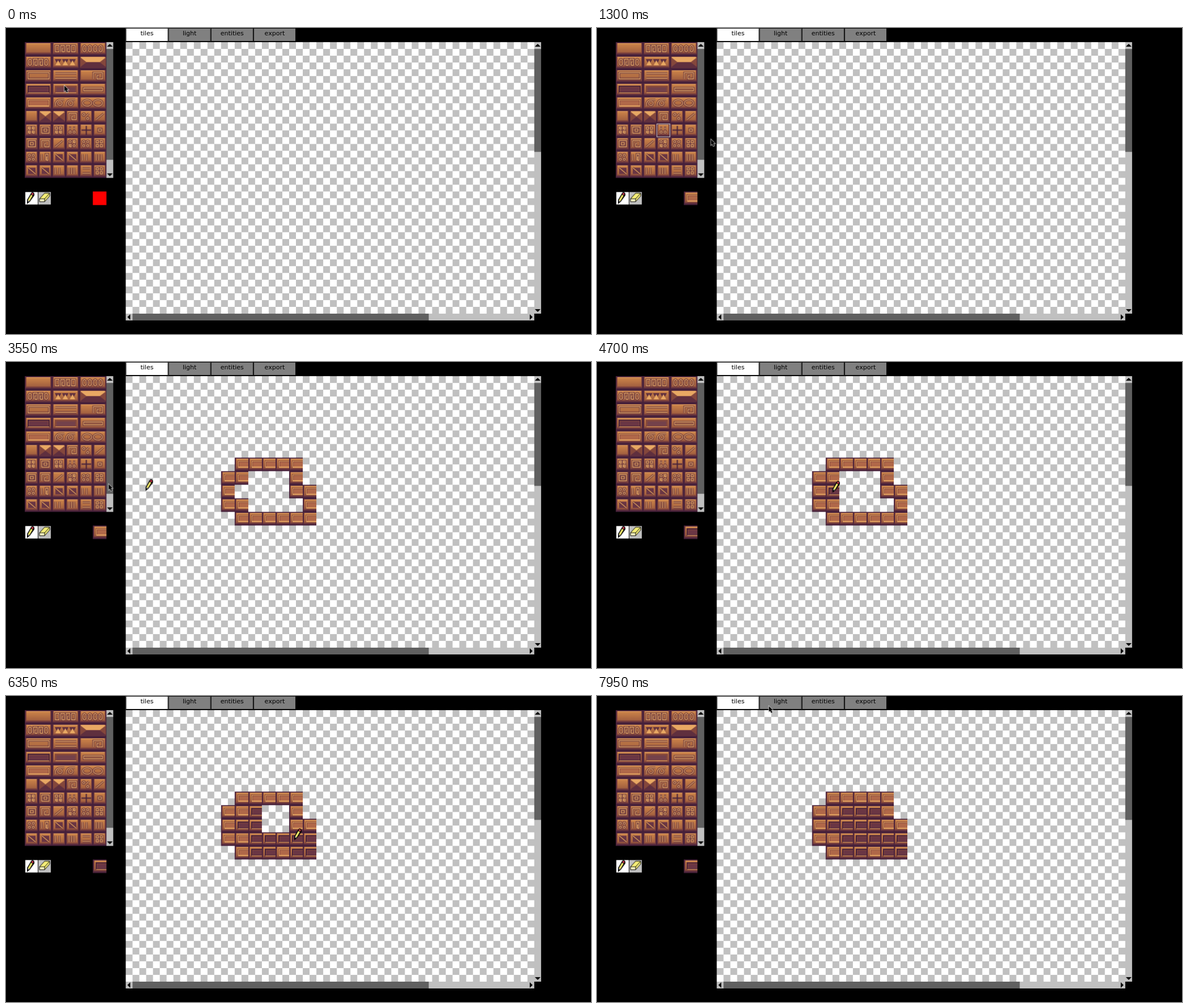
Write an HTML page with a canvas that moves like this. It is 1033 px wide and 542 px high and loops after 8 s.

```html
<!DOCTYPE html>
<html lang="en">
<head>
<meta charset="utf-8">
<title>Tile editor</title>
<style>
html, body { margin: 0; width: 100%; height: 100%; overflow: hidden; background: #000; }
main { position: absolute; left: 0; top: 0; width: 1031px; height: 541px; transform: scale(1.00194, 1.00185); transform-origin: 0 0; }
nav { position: absolute; left: 211px; top: 0; display: flex; }
nav span {
  box-sizing: border-box; width: 75px; height: 24px; border: 1px solid #000;
  background: #808080; color: #000; text-align: center;
  font: 11px/18px "DejaVu Sans", sans-serif;
}
nav span:first-child { background: #fff; }
canvas { position: absolute; left: 0; top: 0; }
</style>
</head>
<body>
<main>
  <nav><span>tiles</span><span>light</span><span>entities</span><span>export</span></nav>
  <canvas id="stage" width="1031" height="541"></canvas>
</main>
<script>
const LOOP = 8000, TICK = 50, CELL = 24;
const PICK_LIGHT = 1200, PICK_DARK = 4200;
const DARK = '#45203a', EDGE = '#5f2f3e', SHADE = '#84473c', MID = '#b56d43', LITE = '#e8a863', PLUM = '#6a3644';
const MAP = { x: 211, y: 25, w: 720, h: 480 };
const PAL = { x: 33, y: 25, w: 144, h: 240 };
const stage = document.getElementById('stage');
const view = stage.getContext('2d');
let g = view;

const rect = (color, x, y, w, h) => { g.fillStyle = color; g.fillRect(x, y, w, h); };
const inside = (area, p) => p.x >= area.x && p.y >= area.y && p.x < area.x + area.w && p.y < area.y + area.h;

function poly(color, ...p) {
  g.beginPath();
  for (let i = 0; i < p.length; i += 2) g.lineTo(p[i], p[i + 1]);
  g.closePath();
  g.fillStyle = color;
  g.fill();
}

function line(color, width, path) {
  g.strokeStyle = color;
  g.lineWidth = width;
  g.stroke(new Path2D(path));
}

// --- carved stone tiles: one letter per motif, spread over the face ---
function carve(path) {
  line(EDGE, 3.4, path);
  line(LITE, 1.3, path);
}

function panel(x, y, w, h, rim, fill) {
  rect(rim === DARK ? DARK : SHADE, x - 1, y - 1, w + 2, h + 2);
  rect(rim, x, y, w, h);
  rect(SHADE, x + 1, y + 1, w - 2, h - 2);
  rect(fill, x + 2, y + 2, w - 4, h - 3);
  rect(LITE, x, y + h, w, 1);
}

const motif = {
  ' ': () => {},
  b: (x, y, w, h) => carve(`M${x} ${y}h${w}v${h}h${-w}z`),
  o: (x, y, w, h) => carve(`M${x} ${y + h / 2}a${w / 2} ${h / 2} 0 1 1 0 .1z`),
  s: (x, y, w, h) => carve(`M${x} ${y + h}v${-h}h${w}v${h}h${-w * .6}v${-h * .55}h${w * .25}`),
  c: (x, y, w, h) => { motif.o(x + w / 4, y + 2, w / 2, h - 3); carve(`M${x} ${y + h}q0 ${-h} ${w / 2} ${-h}h${w / 2}`); },
  q: (x, y, w, h) => { motif.b(x, y, w, h); motif.i(x, y, w, h); },
  i: (x, y, w, h) => motif.b(x + w * .3, y + h * .3, w * .4, h * .4),
  v: (x, y, w, h) => { poly(EDGE, x - 1, y, x + w + 1, y, x + w / 2, y + h); poly(LITE, x, y + h, x + w, y + h, x + w / 2, y + 2); },
  '+': (x, y, w, h) => { rect(DARK, x + w / 2 - 1, y - 2, 2, h + 5); rect(DARK, x - 2, y + h / 2 - 1, w + 4, 2); },
  '-': (x, y, w, h) => motif.b(x + 2, y + 3, w - 4, h - 6),
  '=': (x, y, w, h) => { for (const d of [1, h - 1]) carve(`M${x} ${y + d}h${w}`); },
  '|': (x, y, w, h) => { for (let d = 0; d <= w; d += 4.5) carve(`M${x + d} ${y}v${h}`); },
  '/': (x, y, w, h) => carve(`M${x} ${y + h}l${w} ${-h}`),
  '\\': (x, y, w, h) => { rect(PLUM, x, y, w, h); carve(`M${x} ${y}l${w} ${h}`); },
  L: (x, y, w, h) => panel(x, y, w, h, LITE, '#b06849'),
  D: (x, y, w, h) => panel(x, y, w, h, DARK, PLUM),
  M: (x, y, w, h) => panel(x, y, w, h, SHADE, '#74414a'),
  P: (x, y, w, h) => {
    const l = x - 4, r = x + w + 4, b = y + h + 3, in1 = l + h, in2 = r - h, m = y + h / 2;
    poly(SHADE, l, y - 3, r, y - 3, r, b, l, b);
    poly(LITE, l, y - 3, r, y - 3, in2, m, in1, m);
    poly(EDGE, l, b, in1, m, in2, m, r, b);
  }
};

function tile(x, y, w, shown, code) {
  g.save();
  g.beginPath();
  g.rect(x, y, shown, CELL);
  g.clip();
  g.translate(x, y);
  rect(DARK, 0, 0, w, CELL);
  rect(EDGE, 1, 1, w - 2, 21);
  rect(SHADE, 2, 2, w - 4, 18);
  const face = g.createLinearGradient(0, 3, 0, 19);
  face.addColorStop(0, '#cb8349');
  face.addColorStop(1, '#a05e3f');
  rect(face, 3, 3, w - 6, 15);
  rect(LITE, 3, 2, w - 6, 1);

  const n = code.length, square = w === CELL && n === 4;
  const across = square ? 2 : n, down = square ? 2 : 1;
  const stepX = (w - 10) / across, stepY = (square ? 14 : 13) / down;
  const gap = n > 1 ? 3 : 1;
  [...code].forEach((m, i) => motif[m](6 + i % across * stepX, 6 + (i / across | 0) * stepY, stepX - gap, stepY - (square ? 3 : 2)));
  g.restore();
}
const halfTile = (x, y, dark) => tile(x, y, 48, CELL, dark ? 'D' : 'L');

const BIG = ' ,bssb,oooo,osso,vvv,P,b,=, s,D,M,-,L,cc,oo'.split(',');
const SMALL = ' ,P,P,s,o/ o,/,ssss,q,bbss,==oo,+,i,q,s,/,osso,oooo,bbbb,oooo,|s,\\,\\,||,|,\\,\\,||,|,=,bbbb'.split(',');

// --- fixed parts ---
function arrowHead(x, y, dx, dy) {
  poly('#000', x + 3 * dx, y + 3 * dy, x - 2 * dx + 5 * dy, y - 2 * dy + 5 * dx,
    x - 2 * dx - 5 * dy, y - 2 * dy - 5 * dx);
}
function scrollbar(x, y, length, thumb, dx, dy) {
  const bar = (color, from, size) =>
    rect(color, x + from * dx, y + from * dy, dx ? size : 12, dy ? size : 12);
  bar('#c0c0c0', 0, length);
  bar('#606060', 12, thumb);
  arrowHead(x + 6, y + 6, -dx, -dy);
  arrowHead(x + 6 + (length - 12) * dx, y + 6 + (length - 12) * dy, dx, dy);
}

function pencil(x, y) {
  g.save();
  g.translate(x, y);
  poly('#000', 0, 0, 0, -7, 7, -19, 9, -21, 12, -20, 13, -18, 13, -15, 5, -4);
  line('#f7ec6c', 3.2, 'M3 -6L8.5 -15.5');
  line('#fff', 1.2, 'M1.5 -6L3.5 -4.5');
  line('#f04058', 3.2, 'M9.2 -16.6L10.4 -18.8');
  g.restore();
}
function pointer(x, y) {
  const shape = new Path2D(`M${x} ${y}v10l2 -2l2 4l2 -1l-2 -4h3z`);
  g.strokeStyle = '#ddd';
  g.lineWidth = 1.4;
  g.stroke(shape);
  g.fillStyle = '#000';
  g.fill(shape);
}
function eraser(x, y) {
  rect('#c0c0c0', x, y, 22, 22);
  g.save();
  g.translate(x, y);
  const body = 'M2 12L11 2H20V7L11 17H2Z';
  g.fillStyle = '#f6ef78';
  g.fill(new Path2D(body));
  rect('#fffcc8', 2, 12, 9, 5);
  line('#000', 1, body + 'M2 12H11V17M11 12L20 2');
  g.restore();
}

const base = document.createElement('canvas');
base.width = stage.width;
base.height = stage.height;
g = base.getContext('2d');
for (let y = 0; y < MAP.h; y += 12) {
  for (let x = 0; x < MAP.w; x += 12) rect((x + y) % 24 ? '#fff' : '#c0c0c0', MAP.x + x, MAP.y + y, 12, 12);
}
BIG.forEach((code, i) => tile(PAL.x + i % 3 * 48, PAL.y + (i / 3 | 0) * CELL, 48, 48, code));
SMALL.forEach((code, i) => tile(PAL.x + i % 6 * CELL, PAL.y + (5 + (i / 6 | 0)) * CELL, CELL, CELL, code));
scrollbar(177, 25, 240, 196, 0, 1);
scrollbar(931, 25, 480, 182, 0, 1);
scrollbar(211, 505, 720, 522, 1, 0);
rect('#fff', 34, 290, 22, 22);
pencil(37, 311);
eraser(57, 290);
g = view;

// --- the mouse: glides between points, pencil walks from cell to cell ---
const keys = [], painted = [];
const go = (t, x, y) => keys.push({ t, x, y });
const wait = t => keys.push({ ...keys[keys.length - 1], t });

function walk(start, end, c, r, steps, dark, bend = 1) {
  const when = i => start + (end - start) * Math.pow(Math.max(0, i) / steps.length, bend);
  [' ', ...steps].forEach((step, i) => {
    c += (step === 'R') - (step === 'L');
    r += (step === 'D') - (step === 'U');
    go(when(i), MAP.x + (c + .5) * CELL, MAP.y + (r + .5) * CELL + 2);
    painted.push({ t: when(i - .4), c, r, dark });
  });
}

go(0, 103, 102);
go(50, 117, 147);
wait(150);
go(500, 328, 200);
go(1000, 128, 186);
wait(1150);
go(1200, 185, 191);
go(1300, 201, 197);
wait(2200);
walk(2250, 3050, 7, 8, 'URURRRRDDRDDLLLLL', false, 1.18);
wait(3100);
walk(3150, 3250, 8, 10, 'UL', false);
go(3450, 311, 240);
go(3550, 181, 216);
go(3900, 122, 212);
wait(3950);
go(4050, 98, 184);
wait(4300);
go(4550, 438, 230);
wait(4650);
walk(4700, 5500, 8, 8, 'RU', true);
wait(5550);
walk(5600, 6000, 9, 8, 'DDRURRRDL', true);
wait(6150);
walk(6200, 7000, 12, 10, 'ULULUR', true);
wait(7150);
go(7650, 315, 25);
go(7700, 300, 5);
go(LOOP, 304, 20);

function mouse(t) {
  const i = Math.max(1, keys.findIndex(k => k.t >= t));
  const a = keys[i - 1], b = keys[i], f = (t - a.t) / (b.t - a.t);
  return { x: Math.round(a.x + (b.x - a.x) * f), y: Math.round(a.y + (b.y - a.y) * f) };
}

// Latest mouse position, up to time t, within one of the areas.
function lastIn(t, ...areas) {
  for (; t >= 0; t -= TICK) {
    const p = mouse(t), area = areas.find(a => inside(a, p));
    if (area) return { ...p, area };
  }
}

function render(t) {
  g.clearRect(0, 0, stage.width, stage.height);
  g.drawImage(base, 0, 0);
  for (const p of painted) {
    if (p.t <= t) halfTile(MAP.x + p.c * CELL, MAP.y + p.r * CELL, p.dark);
  }

  if (t < PICK_LIGHT) rect('#f00', 153, 289, CELL, CELL);
  else halfTile(153, 289, t >= PICK_DARK);

  const pos = mouse(t), drawing = inside(MAP, pos);
  const mark = lastIn(t - TICK, PAL, MAP);
  if (mark && mark.area === PAL && !drawing) {
    const snap = (v, from) => from + Math.floor((v - from) / CELL) * CELL + .5;
    g.strokeStyle = '#d0d0d0';
    g.lineWidth = 1;
    g.strokeRect(snap(mark.x, PAL.x), snap(mark.y, PAL.y), 23, 23);
  }

  // Once in use, the pencil stays where the mouse last left the map.
  if (drawing || t >= painted[0].t) {
    const spot = lastIn(t, MAP);
    g.save();
    g.beginPath();
    g.rect(MAP.x, MAP.y, MAP.w, MAP.h);
    g.clip();
    pencil(spot.x, spot.y);
    g.restore();
  }
  if (!drawing) pointer(pos.x, pos.y);
}

let shown = -1;
function loop() {
  const t = Math.floor(performance.now() % LOOP / TICK) * TICK;
  if (t !== shown) render(shown = t);
  requestAnimationFrame(loop);
}
loop();
</script>
</body>
</html>
```
